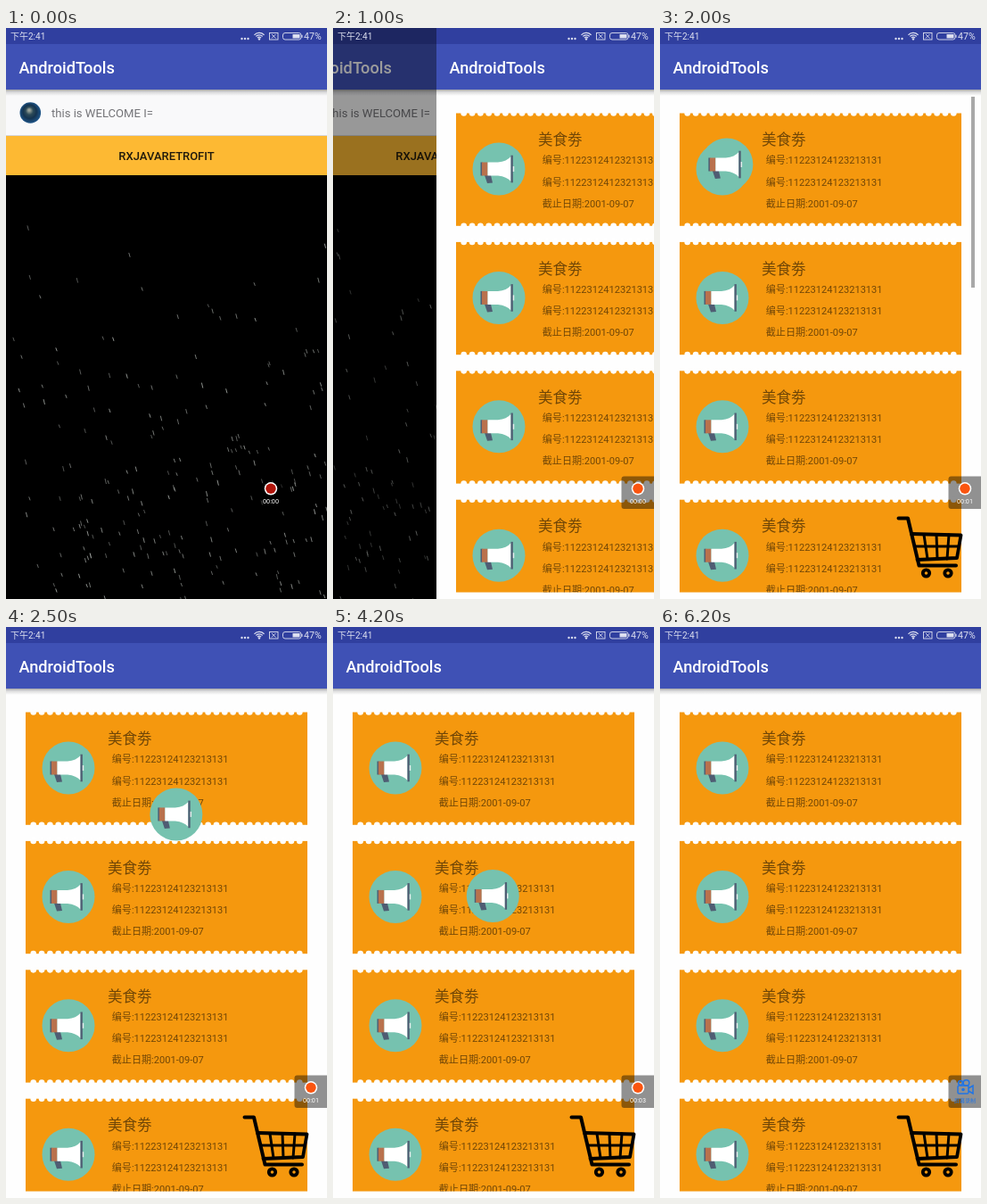
Animation, 360 px wide and 640 px high, one loop 6700 ms. Source, as an HTML page with a canvas:

```html
<!DOCTYPE html>
<html lang="zh-CN">
<head>
<meta charset="utf-8">
<title>AndroidTools</title>
<style>
html, body { margin: 0; width: 100%; height: 100%; overflow: hidden; background: #fff; }
canvas { display: block; width: 360px; height: 640px; }
</style>
</head>
<body>
<canvas id="stage"></canvas>
<script>
const W = 360, H = 640, LOOP = 6700;
const FONT = 'Roboto, "Noto Sans CJK SC", "Noto Sans CJK", sans-serif';
const ICON = { x: 70, y: 158 }, CART = { x: 302, y: 581 };
const PITCH = 144.4, CARD_TOP = 95.5, CARD_H = 126.3;

const canvas = document.getElementById('stage');
const c = canvas.getContext('2d');
const dpr = window.devicePixelRatio || 1;
canvas.width = W * dpr;
canvas.height = H * dpr;

const clamp = v => Math.max(0, Math.min(1, v));
const span = (t, from, length) => clamp((t - from) / length);
const easeOut = p => 1 - Math.pow(1 - p, 3);

function rect(x, y, w, h, fill) {
  c.fillStyle = fill;
  c.fillRect(x, y, w, h);
}

function disc(x, y, r, fill) {
  c.fillStyle = fill;
  c.beginPath();
  c.arc(x, y, r, 0, 7);
  c.fill();
}

function label(s, x, y, size, fill, weight = 400, align = 'left') {
  c.font = `${weight} ${size}px ${FONT}`;
  c.textAlign = align;
  c.fillStyle = fill;
  c.fillText(s, x, y);
}

function path(points, close) {
  c.beginPath();
  points.forEach(([x, y]) => c.lineTo(x, y));
  if (close) c.closePath();
}

function poly(points, fill) {
  path(points, true);
  c.fillStyle = fill;
  c.fill();
}

function line(points, color, width, close) {
  path(points, close);
  c.strokeStyle = color;
  c.lineWidth = width;
  c.stroke();
}

function at(x, y, draw) {
  c.save();
  c.translate(x, y);
  draw();
  c.restore();
}

function random(seed) {
  return () => {
    seed = (seed * 1664525 + 1013904223) >>> 0;
    return seed / 4294967296;
  };
}

const rnd = random(2741);
const drops = Array.from({ length: 220 }, () => ({
  x: rnd() * W, top: 8 + rnd() * 340, phase: rnd(), speed: 110 + rnd() * 90,
  len: 3.5 + rnd() * 2.5, alpha: 0.45 + rnd() * 0.4
}));

function rain(t) {
  rect(0, 165, W, 475, '#000');
  for (const d of drops) {
    const range = 475 - d.top;
    const y = (d.phase * range + d.speed * t / 1000) % range;
    const x = d.x + y * 0.08, top = 165 + d.top + y;
    line([[x, top], [x + 1.4, top + d.len]], `rgba(215,220,215,${d.alpha})`, 0.8);
  }
}

function header() {
  const g = c.createLinearGradient(0, 69, 0, 76);
  g.addColorStop(0, 'rgba(0,0,0,.34)');
  g.addColorStop(0.4, 'rgba(0,0,0,.13)');
  g.addColorStop(1, 'rgba(0,0,0,0)');
  rect(0, 69, W, 7, g);
  rect(0, 0, W, 18, '#303f9f');
  rect(0, 18, W, 51, '#3f51b5');
  label('AndroidTools', 14.5, 51.3, 18.2, '#fff', 500);
}

function avatar() {
  const g = c.createRadialGradient(26, 92, 1, 27, 95, 12);
  g.addColorStop(0, '#9aa39a');
  g.addColorStop(0.3, '#2c4a58');
  g.addColorStop(0.6, '#143350');
  g.addColorStop(1, '#1f568a');
  disc(27.3, 95, 11.8, g);
}

function homePage(t) {
  rect(0, 0, W, H, '#f9f9fa');
  header();
  avatar();
  label('this is WELCOME I=', 51, 100.3, 13.1, '#747478');
  rain(t);
  rect(0, 120, W, 1, '#d5d5d8');
  rect(0, 121, W, 44, '#fdb933');
  label('RXJAVARETROFIT', 180, 147.8, 13, '#211a0c', 500, 'center');
}

function megaphone(x, y) {
  at(x, y, () => {
    disc(0, 0, 29.5, '#76c2af');
    poly([[-16, 7], [-9, 7], [-7, 15.5], [-13, 16]], '#4f5d73');
    rect(-20.5, -7.5, 2, 15, '#4f5d73');
    rect(-19, -7.5, 6.5, 15, '#b9714d');
    c.fillStyle = '#fff';
    c.beginPath();
    c.moveTo(-12.5, -7.5);
    c.lineTo(-1, -7.5);
    c.quadraticCurveTo(9, -8.5, 13.5, -14);
    c.lineTo(13.5, 14);
    c.quadraticCurveTo(9, 8.5, -1, 7.5);
    c.lineTo(-12.5, 7.5);
    c.fill();
    rect(13.5, -15.3, 2.3, 30.6, '#4f5d73');
    rect(15.8, -3, 1.4, 6, '#e8eeee');
  });
}

function card(y) {
  const x = 22, w = 316, r = 3.33, gap = 2.67, step = 2 * r + gap;
  const count = Math.floor((w - gap) / step);
  const first = x + gap + r + ((w - gap) % step) / 2;
  rect(x, y, w, CARD_H, '#f5980e');
  for (let i = 0; i < count; i++) {
    disc(first + i * step, y, r, '#fefefe');
    disc(first + i * step, y + CARD_H, r, '#fefefe');
  }
  const ink = 'rgba(0,0,0,.54)';
  label('美食劵', 114, y + 35.7, 16.5, ink);
  label('编号:11223124123213131', 118.7, y + 56.8, 11.1, ink);
  label('编号:11223124123213131', 118.7, y + 81, 11.1, ink);
  label('截止日期:2001-09-07', 118.7, y + 105, 11.1, ink);
  megaphone(ICON.x, y + ICON.y - CARD_TOP);
}

function cart() {
  c.lineCap = c.lineJoin = 'round';
  line([[267.5, 549.5], [278, 549.5], [290.5, 602.5], [332, 602.5]], '#000', 4);
  line([[282, 567], [337.5, 568.5], [333, 594], [288.5, 596]], '#000', 3.8);
  line([[286, 581], [335, 581]], '#000', 3);
  line([[296, 568], [300, 595]], '#000', 3);
  line([[310, 568], [311, 595]], '#000', 3);
  line([[324, 568], [322, 595]], '#000', 3);
  c.lineCap = 'butt';
  c.lineJoin = 'miter';
  for (const x of [298.5, 323]) {
    disc(x, 611, 5.6, '#000');
    disc(x, 611, 1.8, '#f5980e');
  }
}

// Quadratic throw from a row's icon into the cart
function flight(t, start, row) {
  const p = (t - start) / 1000;
  if (p <= 0 || p >= 1) return;
  const y0 = ICON.y + row * PITCH, q = 1 - p;
  const x = ICON.x + (CART.x - ICON.x) * p;
  const y = q * q * y0 + 2 * p * q * (y0 - 126) + p * p * CART.y;
  megaphone(x, y);
}

function listPage(t) {
  rect(0, 0, W, H, '#fefefe');
  c.save();
  c.beginPath();
  c.rect(0, 69, W, 563.5);
  c.clip();
  for (let i = 0; i < 4; i++) card(CARD_TOP + i * PITCH);
  c.restore();
  cart();
  const bar = 1 - span(t, 2050, 250);
  if (bar > 0) rect(349, 77, 4, 214, `rgba(0,0,0,${0.34 * bar})`);
  header();
  flight(t, 1980, 0);
  flight(t, 3730, 1);
}

function statusIcons() {
  const ink = '#dde0f0';
  label('下午2:41', 5, 13, 10, ink);
  label('47%', 334, 13, 10.6, ink);
  for (const x of [264.5, 268, 271.5]) disc(x, 12, 1.2, ink);
  c.strokeStyle = ink;
  c.lineWidth = 1.2;
  for (const r of [2.8, 5.2, 7.6]) {
    c.beginPath();
    c.arc(284, 13, r, -Math.PI * 0.76, -Math.PI * 0.24);
    c.stroke();
  }
  disc(284, 12.4, 1.2, ink);
  c.lineWidth = 0.9;
  c.strokeRect(295.5, 5.5, 9.5, 7.5);
  line([[298, 7], [302.5, 11.5]], ink, 0.9);
  line([[302.5, 7], [298, 11.5]], ink, 0.9);
  c.beginPath();
  c.roundRect(310.5, 5.5, 20.5, 7.5, 2.5);
  c.stroke();
  rect(321.5, 7, 8, 4.5, ink);
  rect(331.3, 7.8, 1.2, 3, ink);
}

function camera(x, y) {
  const blue = '#1f74e6';
  c.strokeStyle = blue;
  c.lineWidth = 1.5;
  c.beginPath();
  c.roundRect(x - 8, y - 2, 12, 9, 1.5);
  c.stroke();
  for (const [dx, r] of [[-5, 2.4], [1.5, 3.3]]) {
    c.beginPath();
    c.arc(x + dx, y - 5, r, 0, 7);
    c.stroke();
  }
  line([[x + 4, y + 1], [x + 9, y - 2], [x + 9, y + 7], [x + 4, y + 4]], blue, 1.5);
  disc(x - 2, y + 2.5, 1.8, blue);
  label('屏幕录制', x, 533, 6, blue, 400, 'center');
}

function recorder(t) {
  const x = 297 + 45 * easeOut(span(t, 50, 300));
  c.fillStyle = 'rgba(0,0,0,.43)';
  c.beginPath();
  c.roundRect(x - 18.5, 502.5, 40, 36.5, 3);
  c.fill();
  if (t >= 5800) return camera(x, 516);
  const pressed = t < 300 || t >= 5700;
  disc(x, 516.3, 7.2, '#fff');
  disc(x, 516.3, 5.7, pressed ? '#b0140a' : '#fa5510');
  const seconds = Math.min(4, Math.max(0, Math.floor(t / 1000) - 1));
  label('00:0' + seconds, x, 533.3, 7.2, '#fff', 400, 'center');
}

function draw(t) {
  c.setTransform(dpr, 0, 0, dpr, 0, 0);
  const slide = easeOut(span(t, 794, 660));
  if (slide < 1) {
    at(-0.23 * W * slide, 0, () => homePage(t));
    rect(0, 0, W, H, `rgba(0,0,0,${0.58 * slide})`);
  }
  if (slide > 0) at(Math.round(W * (1 - slide)), 0, () => listPage(t));
  statusIcons();
  recorder(t);
}

const begin = performance.now();
function tick() {
  draw((performance.now() - begin) % LOOP);
  requestAnimationFrame(tick);
}
tick();
</script>
</body>
</html>
```
